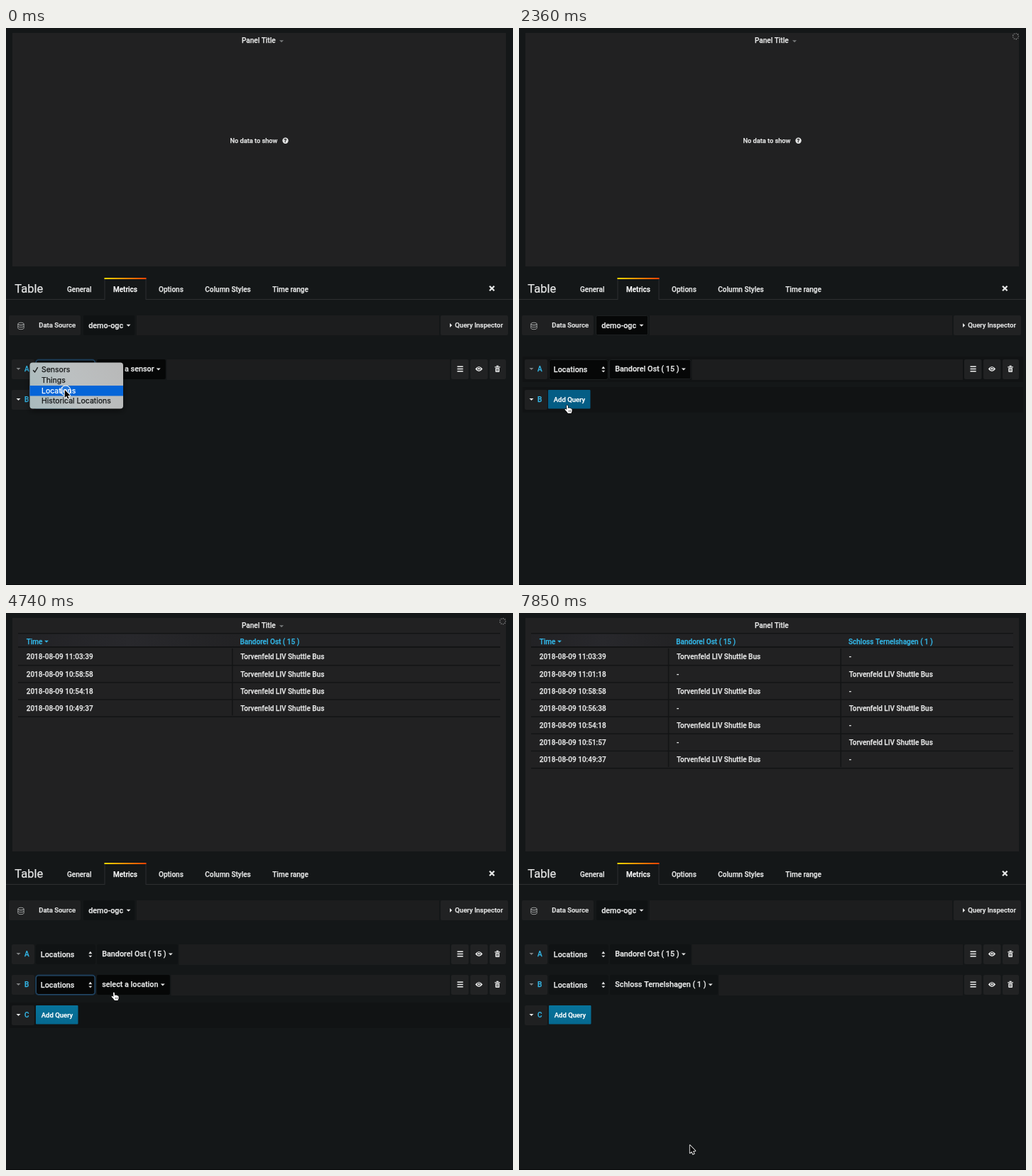
An HTML page with a canvas that plays this animation: 714x785 px, repeating every 7.99 s.

```html
<!DOCTYPE html>
<html lang="en">
<head>
<meta charset="utf-8">
<title>Table panel editor</title>
<style>
  html, body { margin: 0; width: 100%; height: 100%; overflow: hidden; background: #141718; }
  canvas { display: block; width: 714px; height: 785px; }
</style>
</head>
<body>
<canvas id="stage"></canvas>
<script>
const W = 714, H = 785, LOOP = 7990, STEP = 148;
const canvas = document.getElementById('stage');
const ctx = canvas.getContext('2d');
const ratio = window.devicePixelRatio || 1;
canvas.width = W * ratio;
canvas.height = H * ratio;

const WHITE = '#e6e7e7', BLUE = '#33b5e5', PAGE = '#141718', PANEL = '#212122';
const FIELD = '#1c1d1e', LINE = '#131415', BLACK = '#060707', STRIP = '#111314';
const EAST = 'Bandorel Ost ( 15 )';
const CASTLE = 'Schloss Ternelshagen ( 1 )';
const BUS = 'Torvenfeld LIV Shuttle Bus';
const KINDS = ['Sensors', 'Things', 'Locations', 'Historical Locations'];
const PLACES = ['select a location', EAST];
for (let i = 13; i > 0; i--) PLACES.push(`Checkpoint ${i} ( ${i + 1} )`);
PLACES.push(CASTLE);

const ROW_Y = [467, 510, 553];
const PITCH = 19.45;

// step, x, y of the pointer
const PATH = [
  [0, 82, 509], [3, 88, 507], [6, 147, 491], [8, 176, 482], [9, 181, 483], [10, 184, 492],
  [12, 185, 519], [13, 185, 519], [14, 150, 523], [16, 66, 531], [17, 66, 530], [18, 74, 527],
  [21, 100, 520], [22, 103, 521], [26, 110, 548], [29, 110, 548], [32, 150, 534],
  [35, 180, 527], [36, 185, 561], [43, 202, 755], [51, 202, 755], [53, 240, 749]
];
const CLICKS = [0, 1, 9, 13, 17, 21, 28, 35, 43];

const within = (n, a, b) => n >= a && n <= b;

function rect(x, y, w, h, fill, r = 0) {
  ctx.fillStyle = fill;
  ctx.beginPath();
  ctx.roundRect(x, y, w, h, r);
  ctx.fill();
}

function frame(x, y, w, h, color, r = 3, width = 1) {
  ctx.strokeStyle = color;
  ctx.lineWidth = width;
  ctx.beginPath();
  ctx.roundRect(x, y, w, h, r);
  ctx.stroke();
}

// y is the middle of the capitals; the hairline gives the heavier screen smoothing
function text(s, x, y, size = 10, color = WHITE, weight = 500, family = 'Roboto') {
  ctx.font = `${weight} ${size}px ${family}, sans-serif`;
  ctx.fillStyle = ctx.strokeStyle = color;
  ctx.lineWidth = 0.25;
  ctx.lineJoin = 'round';
  ctx.fillText(s, x, y + size * 0.355);
  ctx.strokeText(s, x, y + size * 0.355);
}

function shape(points, x, y, fill, stroke, width = 1) {
  ctx.beginPath();
  points.forEach(([px, py]) => ctx.lineTo(x + px, y + py));
  ctx.closePath();
  ctx.lineJoin = 'round';
  if (stroke) {
    ctx.strokeStyle = stroke;
    ctx.lineWidth = width;
    ctx.stroke();
  }
  ctx.fillStyle = fill;
  ctx.fill();
}

const down = (x, y, color = WHITE, s = 3) => shape([[-s, -s / 2], [s, -s / 2], [0, s / 2]], x, y, color);
const up = (x, y, color = WHITE, s = 2.5) => shape([[-s, s / 2], [s, s / 2], [0, -s / 2 - 1]], x, y, color);

function disc(x, y, r, fill) {
  ctx.fillStyle = fill;
  ctx.beginPath();
  ctx.arc(x, y, r, 0, 7);
  ctx.fill();
}

function blend(x0, y0, x1, y1, ...colors) {
  const g = ctx.createLinearGradient(x0, y0, x1, y1);
  colors.forEach((c, i) => g.addColorStop(i / (colors.length - 1), c));
  return g;
}

function drawTable(heads, cols, rows) {
  const bottom = 49.5 + rows.length * 24.2;
  rect(17, 29, 679, 18, blend(17, 0, cols[1], 0, '#222225', '#28282c', '#222224'));
  rect(17, 28, 679, 1.5, LINE);
  rect(17, 47, 679, 2, LINE);
  heads.forEach((h, i) => text(h, cols[i], 40.3, 10, BLUE));
  down(57, 40.3, BLUE);
  rows.forEach((cells, r) => {
    const y = 61.8 + r * 24.15;
    cells.forEach((c, i) => text(c, cols[i] + (i ? 0.7 : 0), y));
    rect(17, y + 11.2, 679, 1.5, LINE);
  });
  cols.slice(1).forEach(x => rect(x - 11.5, 50, 1.5, bottom - 52, LINE));
}

function drawPanel(n) {
  rect(9, 7, 695, 329, PANEL);
  text('Panel Title', 332, 17.5);
  if (n < 44) down(388, 18.7, '#77797a');
  const day = '2018-08-09 ';
  if (n < 19) {
    text('No data to show', 315.5, 158.5, 9.2);
    disc(393.5, 158.7, 4.2, WHITE);
    text('?', 391.6, 158.8, 7.6, PANEL, 700);
  } else if (n < 49) {
    const times = ['11:03:39', '10:58:58', '10:54:18', '10:49:37'];
    drawTable(['Time', EAST], [28.7, 329.5], times.map(t => [day + t, BUS]));
  } else {
    const times = ['11:03:39', '11:01:18', '10:58:58', '10:56:38', '10:54:18', '10:51:57', '10:49:37'];
    drawTable(['Time', EAST, CASTLE], [28.7, 221.3, 464],
      times.map((t, i) => i % 2 ? [day + t, '-', BUS] : [day + t, BUS, '-']));
  }
  if (within(n, 14, 18) || within(n, 30, 33) || within(n, 45, 48)) drawSpinner(n);
}

function drawSpinner(n) {
  for (let i = 0; i < 9; i++) {
    const a = (i + n / 2) * Math.PI * 2 / 9;
    disc(699.5 + 4 * Math.cos(a), 11.7 + 4 * Math.sin(a), 0.8, i % 3 ? '#77797a' : '#939595');
  }
}

function drawTabs() {
  rect(0, 382, W, 1, '#2d2f30');
  rect(139, 353, 58, 31, PAGE);
  rect(138.5, 354, 1, 29, '#2d2f30');
  rect(196.5, 354, 1, 29, '#2d2f30');
  rect(138.5, 352, 59, 2, blend(139, 0, 197, 0, '#ffd500', '#ff4400'));
  text('Table', 12.3, 367.2, 16.5, WHITE, 400);
  text('General', 86, 368);
  text('Metrics', 151, 368, 10, '#ffffff');
  text('Options', 215, 368);
  text('Column Styles', 280.3, 368);
  text('Time range', 375.3, 368);
  ctx.strokeStyle = WHITE;
  ctx.lineWidth = 2.3;
  ctx.beginPath();
  ctx.moveTo(681, 363.7); ctx.lineTo(687.6, 370.3);
  ctx.moveTo(687.6, 363.7); ctx.lineTo(681, 370.3);
  ctx.stroke();
}

function drawSource(deep) {
  rect(4, 405, 101, 28, '#1f2021', 2);
  rect(109, 405, 72, 28, deep ? BLACK : '#0f1213', 2);
  if (deep) frame(108.5, 405.5, 73, 27, '#1d2021', 2);
  rect(184, 405, 426, 28, FIELD);
  rect(612, 405, 95, 28, '#212223', 2);
  ctx.strokeStyle = '#a4a6a6';
  ctx.lineWidth = 0.9;
  ctx.beginPath();
  ctx.ellipse(21, 417, 4.2, 1.8, 0, 0, 7);
  for (const y of [417, 420, 423]) {
    ctx.moveTo(25.2, y);
    ctx.ellipse(21, y, 4.2, 1.7, 0, 0, Math.PI);
  }
  ctx.moveTo(16.8, 417); ctx.lineTo(16.8, 423);
  ctx.moveTo(25.2, 417); ctx.lineTo(25.2, 423);
  ctx.stroke();
  text('Data Source', 46.2, 419, 9.5);
  text('demo-ogc', 116.2, 419, 10.8);
  down(172.5, 419.3);
  shape([[0, -3], [3.2, 0], [0, 3]], 625, 419, WHITE);
  text('Query Inspector', 632.3, 419, 9.5);
}

function drawTools(y) {
  for (const x of [627, 654, 681]) rect(x, y, x < 680 ? 24.5 : 23, 28, '#212223', 2);
  const m = y + 13.5;
  for (const d of [-3.3, 0, 3.3]) rect(635.5, m + d - 0.8, 8.2, 1.6, WHITE);
  ctx.fillStyle = WHITE;
  ctx.beginPath();
  ctx.moveTo(660.8, m);
  ctx.quadraticCurveTo(666, m - 7, 671.2, m);
  ctx.quadraticCurveTo(666, m + 7, 660.8, m);
  ctx.fill();
  disc(666, m - 0.3, 2.3, '#212223');
  disc(666, m - 0.3, 1.4, WHITE);
  rect(688.3, m - 3.3, 7.6, 1.3, WHITE);
  rect(690.6, m - 4.8, 3, 1.5, WHITE);
  rect(689.2, m - 1.5, 5.8, 6, WHITE, 1);
  rect(690.8, m - 0.5, 0.8, 3.8, '#212223');
  rect(692.7, m - 0.5, 0.8, 3.8, '#212223');
}

function drawToggle(letter, y, caret) {
  rect(8, y, 32, 28, '#1f2021', 2);
  down(17.5, y + 13.5, caret);
  text(letter, 26, y + 13.6, 10, BLUE);
}

function drawQuery(q, y, deep) {
  const dark = deep || q.active;
  if (deep) rect(5, y - 4, 705, 36, STRIP);
  drawToggle(q.letter, y, '#7f8182');
  rect(42, y, 84, 28, dark ? BLACK : '#101314', 3);
  if (q.focus) {
    frame(42, y + 0.5, 83.5, 27.5, '#16324a', 4, 2);
    frame(42.5, y + 1, 82.5, 26.5, '#2b506c', 3, 0.8);
  } else if (dark) frame(42.5, y + 0.5, 83, 28, '#1d2021');
  text(q.kind, 48.8, y + 14.3, 10.8);
  up(118.8, y + 12);
  down(118.8, y + 17, WHITE, 2.5);
  let end;
  if (q.open) {
    end = 220;
    rect(127.5, y, 92, 27, BLACK, 3);
    frame(127.5, y + 0.5, 91.5, 27, '#1d4463', 3, 1.2);
    rect(135.8, y + 7, 1, 13, WHITE);
  } else {
    ctx.font = '500 10.8px Roboto, sans-serif';
    const w = ctx.measureText(q.value).width;
    end = 128 + w + 24;
    rect(128, y, w + 23.5, 28, dark ? BLACK : '#101314', 2);
    if (deep) frame(127.5, y + 0.5, w + 24, 27, '#1d2021', 2);
    text(q.value, 135.2, y + 13.6, 10.8);
    down(135.2 + w + 6.2, y + 14);
  }
  rect(end + 1, y, 624 - end, 29, FIELD);
  drawTools(y);
}

function drawAdd(letter, y, strip, hover) {
  if (strip) rect(5, y - 4, 705, 36, STRIP);
  drawToggle(letter, y, WHITE);
  const x = y === ROW_Y[2] ? 42 : 41;
  rect(x, y, 59.5, 26.5, hover ? '#045d85' : blend(0, y, 0, y + 27, '#07739b', '#05688f'), 1);
  text('Add Query', x + 7.8, y + 13.4, 9.5, '#ffffff');
}

function drawList(y, scroll) {
  const top = y + 30;
  rect(127.5, top, 152.5, 232, '#232427', 2);
  ctx.save();
  ctx.beginPath();
  ctx.rect(127, top, 153, 232);
  ctx.clip();
  PLACES.forEach((p, i) => text(p, 138.8, y + 39.5 + i * PITCH - scroll));
  ctx.restore();
  rect(274.5, top + 1 + scroll * 0.75, 4.5, 171, '#4a4b50', 1);
}

function drawPopup(y, py, alpha) {
  const top = y + 4.5;
  const pick = Math.max(0, Math.min(3, Math.floor((py - y - 7) / 14.7)));
  ctx.save();
  ctx.globalAlpha = alpha;
  ctx.shadowColor = 'rgba(0,0,0,.5)';
  ctx.shadowBlur = 8;
  ctx.shadowOffsetY = 3;
  rect(33.5, top, 131.5, 65, blend(33, top + 65, 165, top, '#a8bbbd', '#bcc0c1', '#b8b8b8'), 4);
  ctx.shadowColor = 'transparent';
  rect(33.5, top + 3 + pick * 14.7, 131.5, 14.7, '#0565d8');
  KINDS.forEach((k, i) => {
    text(k, 50, y + 14.6 + i * 14.7, 10.5, i === pick ? '#ffffff' : '#17191a', 400, 'Inter');
  });
  ctx.strokeStyle = pick ? '#17191a' : '#ffffff';
  ctx.lineWidth = 1.4;
  ctx.beginPath();
  ctx.moveTo(38.2, y + 15.2);
  ctx.lineTo(40.6, y + 18);
  ctx.lineTo(44.7, y + 11.2);
  ctx.stroke();
  ctx.restore();
}

function pointerAt(n) {
  const i = PATH.findIndex(p => p[0] >= n);
  if (i < 1) return PATH[i ? PATH.length - 1 : 0].slice(1);
  const [a, ax, ay] = PATH[i - 1], [b, bx, by] = PATH[i];
  const k = (n - a) / (b - a);
  return [ax + (bx - ax) * k, ay + (by - ay) * k];
}

const ARROW = [[0, 0], [0, 11], [2.5, 8.8], [4.2, 12.6], [6, 11.9], [4.3, 8.2], [7.7, 8]];
const HAND = [[1, 0.8], [2.6, 0.8], [3.3, 5], [5, 4.5], [6.8, 5.2], [8.5, 6], [8.6, 9],
  [7.5, 12], [3, 12], [0.6, 9], [-1.6, 6.7], [-0.5, 5.8], [1.4, 7]];

function drawPointer(n, x, y) {
  if (CLICKS.includes(n)) {
    disc(x + 2, y + 2, 7, 'rgba(255,255,255,.12)');
    frame(x - 5, y - 5, 14, 14, '#f2f4f6', 7, 1.1);
  }
  if (within(n, 5, 18) || within(n, 31, 43)) {
    shape(HAND, x, y, '#ffffff', '#000000', 1.2);
    rect(x + 4.1, y + 7.5, 0.7, 2.8, '#222222');
    rect(x + 6, y + 7.5, 0.7, 2.8, '#222222');
  } else {
    shape(ARROW, x + 0.7, y + 1, '#050505', '#ffffff', 1.7);
  }
}

function draw(n) {
  const deep = within(n, 14, 21) || within(n, 44, 48);
  const [px, py] = pointerAt(n);
  const queries = [{
    letter: 'A',
    kind: n < 3 ? 'Sensors' : 'Locations',
    value: n < 3 ? 'select a sensor' : n < 14 ? 'select a location' : EAST,
    active: n < 14, focus: n < 10, open: within(n, 10, 13)
  }];
  if (n >= 18) queries.push({
    letter: 'B',
    kind: n < 30 ? 'Sensors' : 'Locations',
    value: n < 30 ? 'select a sensor' : n < 48 ? 'select a location' : CASTLE,
    active: n < 49, focus: within(n, 22, 35), open: within(n, 36, 43)
  });

  ctx.setTransform(ratio, 0, 0, ratio, 0, 0);
  rect(0, 0, W, H, PAGE);
  rect(0, H - 1, W, 1, '#090b0b');
  drawPanel(n);
  drawTabs();
  drawSource(deep);
  queries.forEach((q, i) => drawQuery(q, ROW_Y[i], deep));
  const last = queries.length;
  drawAdd('ABC'[last], ROW_Y[last], within(n, 14, 35) || within(n, 44, 48), within(n, 16, 17));
  if (n < 3) drawPopup(ROW_Y[0], py, n < 2 ? 1 : 0.5);
  if (within(n, 22, 29)) drawPopup(ROW_Y[1], py, n < 29 ? 1 : 0.5);
  queries.forEach((q, i) => {
    if (q.open) drawList(ROW_Y[i], Math.max(0, Math.min(1, (n - 37) / 5)) * 78);
  });
  drawPointer(n, px, py);
}

// the screen advances in even steps
function tick(now) {
  draw(Math.floor((now % LOOP + 9) / STEP));
  requestAnimationFrame(tick);
}
draw(0);
requestAnimationFrame(tick);
</script>
</body>
</html>
```
